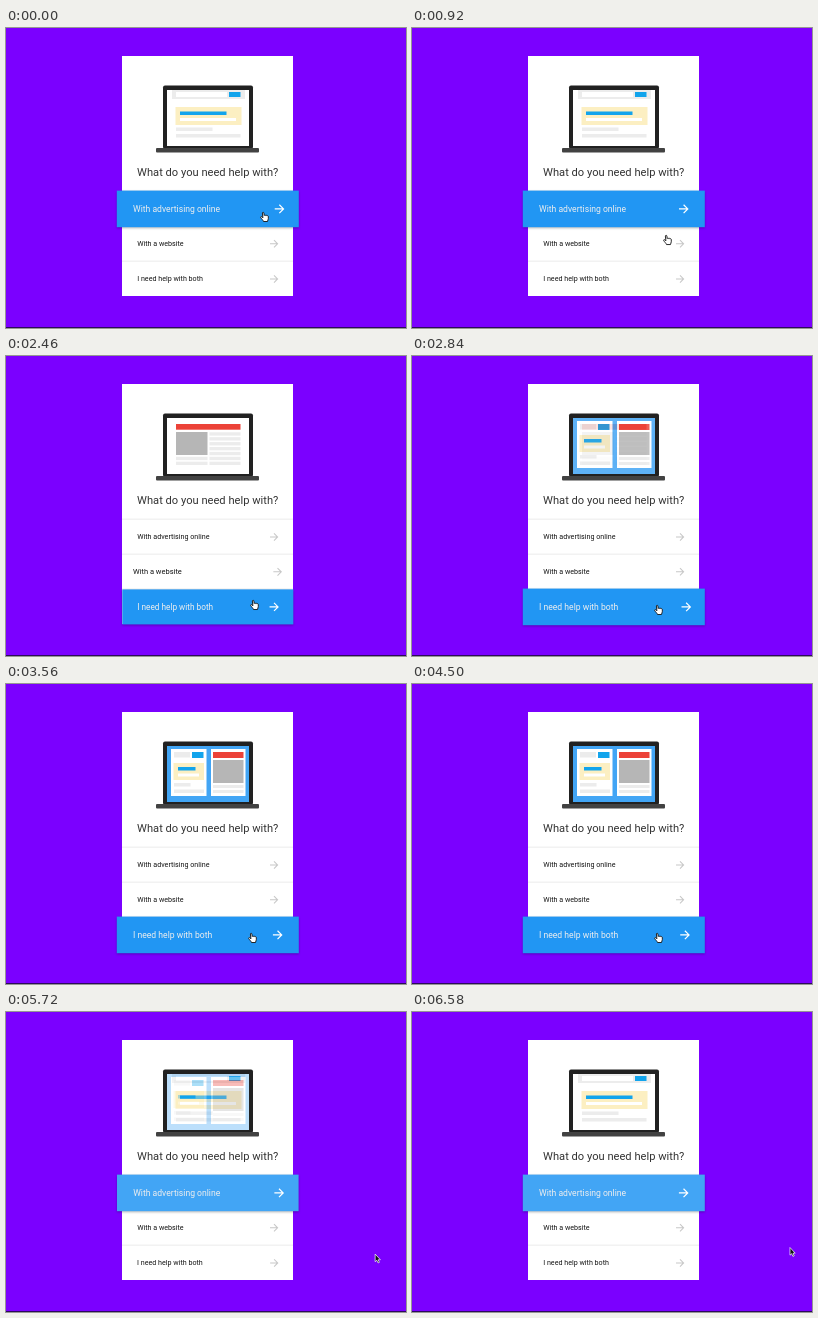
Write an HTML page that moves like this. It is 400 by 300 pixels and loops after 6.6 s.

```html
<!DOCTYPE html>
<html lang="en">
<head>
<meta charset="utf-8">
<title>Help choices</title>
<style>
html, body { margin: 0; width: 100%; height: 100%; overflow: hidden; background: #7b00ff; }
svg { display: block; width: 400px; height: 300px; font-family: Roboto, sans-serif; }
.bar { filter: drop-shadow(0 1px 1px rgba(0, 0, 0, .28)); }
.arrow { fill: none; stroke-width: 1.1; }
</style>
</head>
<body>
<svg id="stage" viewBox="0 0 400 300"></svg>
<script>
const LOOP = 6600, BOB = 1200;
const stage = document.getElementById('stage');

function add(parent, tag, attrs = {}, text = '') {
  const el = document.createElementNS('http://www.w3.org/2000/svg', tag);
  set(el, attrs);
  el.textContent = text;
  return parent.appendChild(el);
}
function set(el, attrs) {
  for (const k in attrs) el.setAttribute(k, attrs[k]);
}
// Filled box from its left, top, right and bottom edges
function box(parent, fill, l, t, r, b, rx = 0) {
  return add(parent, 'rect', { x: l, y: t, width: r - l, height: b - t, fill, rx });
}

const BLUE = '#12a4ec', RED = '#ec4238', GREY = '#b6b6b6', PALE = '#ececec', CREAM = '#fcefc2';

box(stage, '#7b00ff', 0, 0, 400, 300);
box(stage, '#2c0a5c', 0, 299, 400, 300);
box(stage, '#fff', 116, 28, 287, 268);

// Laptop
box(stage, '#212121', 157, 57.5, 247, 121, 2);
box(stage, '#424242', 150, 120, 253, 124.5, 1);

function screen(fill) {
  const g = add(stage, 'g');
  box(g, fill, 161, 62, 243, 118);
  return g;
}

const ads = screen('#fff');
box(ads, PALE, 166, 62, 239, 71);
box(ads, '#fff', 170, 64, 221, 69);
box(ads, BLUE, 223, 64, 234.5, 69);
box(ads, CREAM, 169.5, 79, 235.5, 97);
box(ads, BLUE, 174, 83.5, 220.5, 87);
box(ads, '#fff', 174, 90, 230, 93);
box(ads, PALE, 170, 99.5, 206.5, 103);
box(ads, PALE, 170, 106, 234.5, 109.5);

const site = screen('#fff');
box(site, RED, 170, 68, 234.5, 73.7);
box(site, GREY, 170, 76, 201.5, 99);
for (let i = 0; i < 7; i++) {
  const y = 76.3 + i * 4.9;
  box(site, PALE, 203.5, y, 234.5, y + 3.3);
  if (i > 4) box(site, PALE, 170, y, 201.5, y + 3.3);
}

const both = screen('#42a5f5');
box(both, '#fff', 165, 65, 200.5, 112);
box(both, PALE, 168, 68, 184, 73.5);
box(both, BLUE, 186, 68, 197.5, 74);
box(both, CREAM, 167.5, 79, 198, 96);
box(both, BLUE, 172, 83, 189.5, 86.5);
box(both, '#fff', 172, 89.5, 193, 92.5);
box(both, PALE, 168, 99, 184.5, 102.5);
box(both, PALE, 168, 105.5, 198, 109);
box(both, '#fff', 205, 65, 239.5, 112);
box(both, RED, 207, 68, 237.5, 74);
box(both, GREY, 207, 76, 237.5, 99);
box(both, PALE, 207, 101, 237.5, 104);
box(both, PALE, 207, 106, 237.5, 109);

add(stage, 'text', { x: 201.7, y: 147.8, 'font-size': 11.15, 'text-anchor': 'middle', fill: '#333' },
  'What do you need help with?');

for (const y of [162.7, 197.7, 232.7]) box(stage, '#e6e6e6', 116, y, 287, y + .8);

// Choices: each is active from start to end
const rows = [
  { label: 'With advertising online', y: 180.9, start: 5400, end: LOOP + 940 },
  { label: 'With a website', y: 215.8, start: 940, end: 2380 },
  { label: 'I need help with both', y: 250.9, start: 2380, end: 5400 },
];
for (const row of rows) {
  row.bar = add(stage, 'rect', { class: 'bar' });
  row.text = add(stage, 'text', {}, row.label);
  row.arrow = add(stage, 'path', { class: 'arrow', d: 'M-4 0H3.8M.2-3.8L4 0L.2 3.8' });
}

const hand = add(stage, 'path', {
  d: 'M-2.6-4c0-1 1.4-1 1.5 0l.3 2.5c.3-.8 1.3-.7 1.4 0 .4-.5 1.2-.4 1.3.3.5-.4 1.4-.1 1.4.7v2.2c0 1-.7 1.5-.8 2.8h-4c-.3-1.3-2-2.5-2.8-4-.3-.8.7-1.3 1.4-.5l.8.8z',
  fill: '#fff', stroke: '#111', 'stroke-width': .9, 'stroke-linejoin': 'round',
});
const pointer = add(stage, 'path', {
  d: 'M-2-4.5V3.2L-.3 1.7L.9 4.4L2.2 3.8L1 1.2H3.2Z',
  fill: '#111', stroke: '#fff', 'stroke-width': .7, 'stroke-linejoin': 'round',
});

// Cursor stops: time, x, y
const path = [
  [0, 259, 189], [640, 259, 189], [780, 258, 196], [920, 256, 212], [1120, 254, 223],
  [2200, 254, 223], [2320, 252, 231], [2460, 249, 249], [2660, 247, 254],
  [5120, 247, 254], [5240, 268, 254], [5360, 319, 251], [5440, 350, 249],
  [5600, 370, 247], [6120, 375, 245], [6580, 380, 240], [LOOP, 380, 240],
];

const ramp = (t, from, span) => Math.min(1, Math.max(0, (t - from) / span));
const ease = p => p * p * (3 - 2 * p);
const mix = (a, b, p) => a + (b - a) * p;
const grey = (a, b, p) => `rgb(${Array(3).fill(Math.round(mix(a, b, p)))})`;

function drawRow(row, i, time) {
  const wrapped = i === 0 && time < 3000;
  const t = wrapped ? time + LOOP : time;
  const level = (delay, span) =>
    ease(ramp(t, row.start + delay, span)) - ease(ramp(t, row.end + delay, span));
  const on = level(0, 40), size = level(0, 120), open = level(100, 250);

  const w = mix(171, 182, open), h = mix(35, 36.6, open);
  set(row.bar, {
    x: 201.8 - w / 2, y: row.y - h / 2, width: w, height: h, opacity: on,
    fill: i === 0 && !wrapped ? '#42a5f5' : '#2196f3',
  });

  const font = mix(7.15, 8.62, size);
  set(row.text, {
    x: mix(131.2, 127, open), y: row.y + font * .35, 'font-size': font, fill: grey(20, 238, on),
  });

  const phase = (t - row.start + (wrapped ? 340 : 0)) / BOB;
  const bob = 1.5 * (1 - Math.cos(2 * Math.PI * phase)) * open * on;
  set(row.arrow, {
    transform: `translate(${mix(267.8, 271.3, open) + bob} ${row.y}) scale(${mix(.95, 1.1, size)})`,
    stroke: grey(200, 255, on),
  });
}

function drawCursor(t) {
  const n = path.findIndex(stop => stop[0] > t);
  const [t0, x0, y0] = path[n - 1], [t1, x1, y1] = path[n];
  const p = (t - t0) / (t1 - t0);
  const x = mix(x0, x1, p), y = mix(y0, y1, p);
  const outside = x > 292;
  set(hand, { transform: `translate(${x} ${y})`, opacity: outside ? 0 : 1 });
  set(pointer, { transform: `translate(${x} ${y})`, opacity: outside ? 1 : 0 });
}

function draw() {
  const t = performance.now() % LOOP;
  set(site, { opacity: t < 4000 ? ease(ramp(t, 1000, 320)) : 0 });
  set(both, { opacity: ease(ramp(t, 2540, 400)) - ease(ramp(t, 5480, 400)) });
  rows.forEach((row, i) => drawRow(row, i, t));
  drawCursor(t);
  requestAnimationFrame(draw);
}
draw();
</script>
</body>
</html>
```
